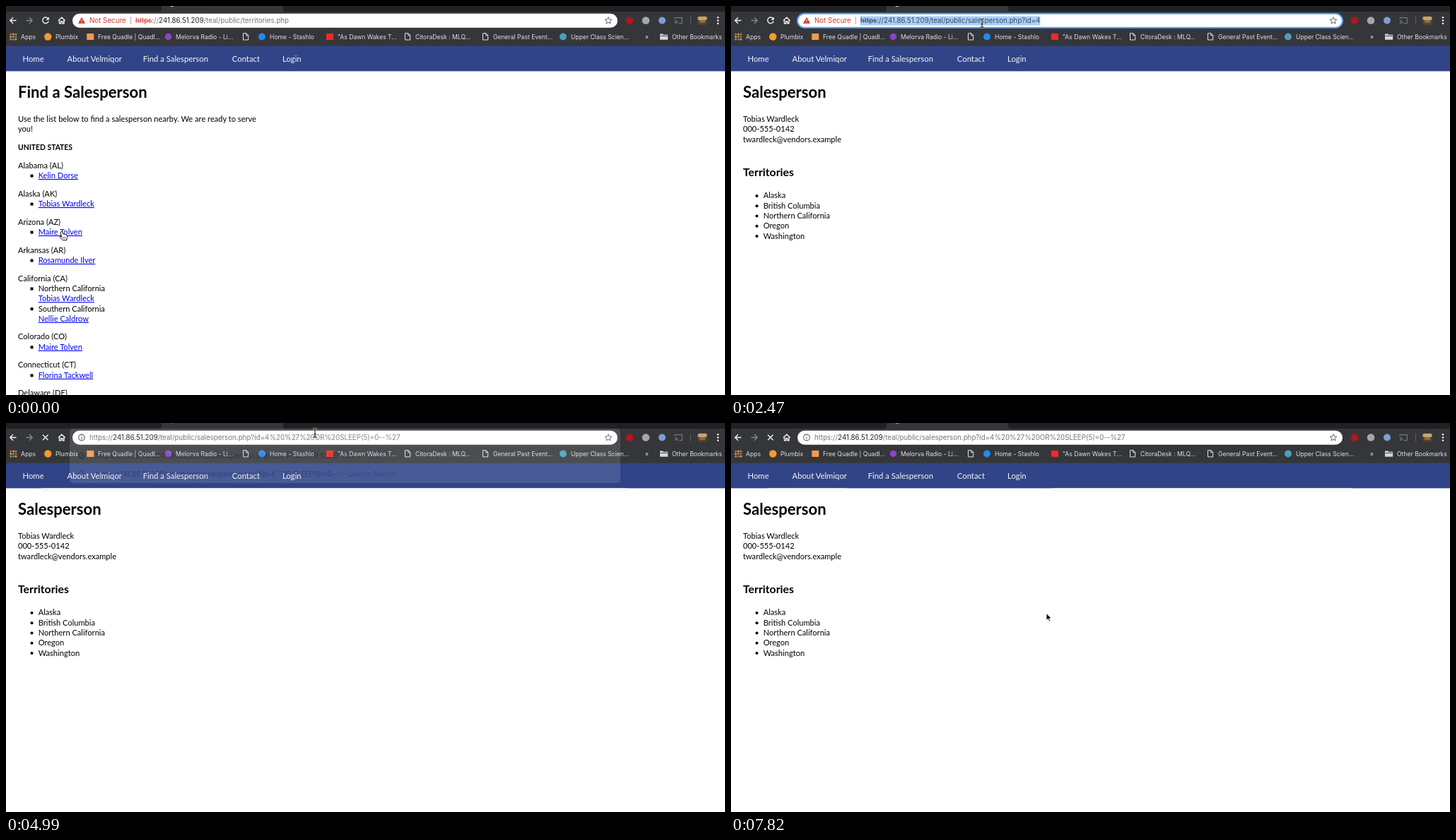
Recreate the animation shown at these times as an HTML page. Size 1017x551 px, loop 8000 ms.

```html
<!DOCTYPE html>
<html lang="en">
<head>
<meta charset="utf-8">
<title>Browser session</title>
<style>
  html, body { margin: 0; width: 100%; height: 100%; overflow: hidden; background: #fff; }
  svg { display: block; width: 100vw; height: 100vh; }
  text { white-space: pre; }
  .page text { font: 11.1px Lato, sans-serif; fill: #000; }
  .page .h1 { font-size: 22.1px; font-weight: 700; }
  .page .h2 { font-size: 15.8px; font-weight: 700; }
  .page .h3 { font-size: 10.4px; font-weight: 700; }
  .page .link { fill: #00e; text-decoration: underline; }
  .page .nav { font-size: 11.3px; fill: #f4f5fa; }
  .ui text { font: 9.76px Inter, sans-serif; fill: #70747a; }
  .ui .mark { font-size: 8.6px; fill: #dfe0e2; }
  .ui .host { fill: #202124; }
  .ui .warn { fill: #d3352b; }
  .ui .strike { fill: #d3352b; text-decoration: line-through; }
  .ui .selected, .ui .selected tspan { fill: #3a4654; }
  .ui .best { font-size: 9.95px; font-weight: 700; fill: #2f7de9; }
  .line { fill: none; stroke-width: 1.4; }
</style>
</head>
<body>
<svg id="stage" viewBox="0 0 1017 551" preserveAspectRatio="none"></svg>
<script>
const LOOP = 8000;
const HOST = '241.86.51.209';
const FOLDER = '/teal/public/';
const PERSON = 'Tobias Wardleck';
const ROW = 14.28, GAP = 11.43;

const text = (x, y, content, cls = '') => `<text x="${x}" y="${y}" class="${cls}">${content}</text>`;
const rect = (x, y, w, h, fill, r = 0) => `<rect x="${x}" y="${y}" width="${w}" height="${h}" rx="${r}" fill="${fill}"/>`;
const dot = (x, y, r, fill) => `<circle cx="${x}" cy="${y}" r="${r}" fill="${fill}"/>`;
const line = (d, stroke, extra = '') => `<path class="line" d="${d}" stroke="${stroke}" ${extra}/>`;
const group = (id, content, cls = '') => `<g id="${id}" class="${cls}">${content}</g>`;
const at = (x, y, content) => `<g transform="translate(${x} ${y})">${content}</g>`;
const address = (path, schemeCls = '') =>
  `<tspan class="${schemeCls}">https</tspan>://<tspan class="host">${HOST}</tspan>${FOLDER}${path}`;

function navBar() {
  const items = [[23.5, 'Home'], [86.5, 'About Velmiqor'], [193.7, 'Find a Salesperson'], [319.8, 'Contact'], [391, 'Login']];
  return rect(0, 56, 1017, 36.4, '#304487') + items.map(([x, label]) => text(x, 79.3, label, 'nav')).join('');
}

function territoryList() {
  const states = [
    ['Alabama (AL)', 'Kelin Dorse'],
    ['Alaska (AK)', PERSON],
    ['Arizona (AZ)', 'Maire Tolven'],
    ['Arkansas (AR)', 'Rosamunde Ilver'],
    ['California (CA)', '*Northern California', PERSON, '*Southern California', 'Nellie Caldrow'],
    ['Colorado (CO)', 'Maire Tolven'],
    ['Connecticut (CT)', 'Florina Tackwell'],
    ['Delaware (DE)']
  ];
  let y = 229.7, out = '';
  for (const [state, ...rows] of states) {
    out += text(17, y, state);
    rows.forEach((row, i) => {
      y += ROW;
      const region = row[0] === '*';
      if (region || i === 0) out += rect(34.5, y - 5.4, 4, 4, '#000');
      out += text(45.7, y, region ? row.slice(1) : row, region ? '' : 'link');
    });
    y += ROW + GAP;
  }
  return out;
}

function listPage() {
  return text(17, 129.5, 'Find a Salesperson', 'h1') +
    text(17, 164, 'Use the list below to find a salesperson nearby. We are ready to serve') +
    text(17, 178.2, 'you!') + text(17, 203.7, 'UNITED STATES', 'h3') + territoryList();
}

function personPage() {
  const contact = [PERSON, '000-555-0142', 'twardleck@vendors.example'];
  const areas = ['Alaska', 'British Columbia', 'Northern California', 'Oregon', 'Washington'];
  return text(17, 129.5, 'Salesperson', 'h1') +
    contact.map((row, i) => text(17, 164 + i * ROW, row)).join('') +
    text(17, 240.7, 'Territories', 'h2') +
    areas.map((row, i) => dot(36.5, 268.9 + i * ROW, 2, '#000') + text(45.7, 272.4 + i * ROW, row)).join('');
}

const sheet = x => line(`M${x - 3.5} 38.7h4.5l2.7 2.7v6.6h-7.2zM${x + .8} 38.7v3h2.9`, '#e4e5e7', 'style="stroke-width:1"');
const globe = y => at(107, y, dot(0, 0, 4.8, '#5f6368') +
  '<path d="M-3.6-1.6l2-1.6 1.6.8-1 1.6 1.4 1.2-1 2.6-1.2-2zM1.4-3.4l2.2 1.6-1.6 1zM1.6.8l2 .4-1.4 2z" fill="#fff"/>');

function bookmarks() {
  const items = [[70, 'Plumbix'], [130, 'Free Quadle | Quadl...'], [240, 'Melorva Radio - Li...'], [373, 'Home - Stashlo'],
    [469, '"As Dawn Wakes T...'], [579, 'CitoraDesk : MLQ...'], [689, 'General Past Event...'], [799, 'Upper Class Scien...'],
    [904, '»'], [942, 'Other Bookmarks'], [21, 'Apps']];
  const tiles = ['#e8574a', '#f0a63c', '#5cb46a'];
  let apps = '';
  for (let i = 0; i < 9; i++) apps += rect(5.5 + i % 3 * 3.6, 38.8 + Math.floor(i / 3) * 3.6, 2.5, 2.5, tiles[(i + Math.floor(i / 3)) % 3]);
  return apps + dot(59.3, 43.5, 5.2, '#f39a32') + rect(114.3, 39, 10, 9, '#ef9b55') +
    dot(229.5, 43.5, 4.7, '#8b45c9') + dot(362, 43.5, 5, '#2489ed') + rect(453, 39, 10, 9, '#ed2b25') +
    dot(788, 43.5, 5, '#4aa0bd') + [339, 568, 678].map(sheet).join('') +
    '<path d="M925 39.5h4l1.2 1.3h6v7h-11.2z" fill="#d5d7da"/>' + line('M925.5 42.5h10.2', '#45464a', 'style="stroke-width:1"') +
    items.map(([x, label]) => text(x, 46.7, label, 'mark')).join('');
}

function toolbar() {
  const white = '#f1f2f3', grey = '#85878b';
  return rect(0, 0, 1017, 56.7, '#35363a') +
    '<path d="M0 0H220V4q0 4-4 4H0zM392 0H1017V8H396q-4 0-4-4z" fill="#202124"/>' +
    line('M14.5 20.5H6M10 16.2L5.8 20.5l4.2 4.3', white) + line('M28.5 20.5H37M33 16.2l4.2 4.3-4.2 4.3', grey) +
    group('reload', line('M59.3 17.4A4.3 4.3 0 1 0 60.2 21.5', white) + '<path d="M60.8 15.4v4.4h-4.4z" fill="#f1f2f3"/>') +
    group('stop', line('M52 16.7l7.6 7.6M59.6 16.7L52 24.3', white)) +
    line('M74 20.8L78.8 16.3l4.8 4.5M75.5 20v4.8h2.2v-3h2.2v3H82V20', white) +
    rect(94, 10.7, 771, 20, '#fff', 10) +
    line('M852 15.7l1.4 3.2 3.5.3-2.7 2.3.8 3.4-3-1.8-3 1.8.8-3.4-2.7-2.3 3.5-.3z', '#5f6368', 'style="stroke-width:1"') +
    dot(882, 20.5, 5.2, '#b1161c') + dot(905, 20.5, 5.3, '#a5a7aa') + dot(928, 20.5, 5, '#7ba0d6') +
    line('M946 18.3V16.6h10.2v8h-3.8M946 24.6h1.2M946 22.5q2 .1 2.2 2.1M946 20.5q4 .1 4.3 4.1', '#85878b', 'style="stroke-width:1"') +
    rect(968, 15, 1, 11, '#5c5e62') +
    rect(978, 14, 14, 13, '#51412f', 3) + rect(978.5, 15, 13, 5, '#c3a574', 2) + rect(981, 20, 8, 4, '#8b6b42') +
    [16.3, 20.5, 24.7].map(y => dot(1007, y, 1.25, white)).join('') + bookmarks();
}

function secureChip() {
  return '<path d="M107 15.8l5 9h-10z" fill="#d3352b"/>' + rect(106.5, 18.7, 1, 3, '#fff') + rect(106.5, 22.5, 1, 1, '#fff') +
    text(118, 24.1, 'Not Secure', 'warn') + rect(176, 15, 1, 11, '#d09a98');
}

function infoChip() {
  return '<circle cx="107" cy="20.5" r="4.4" class="line" stroke="#5f6368" style="stroke-width:1.1"/>' +
    rect(106.5, 20, 1, 3, '#5f6368') + rect(106.5, 18, 1, 1, '#5f6368');
}

function dropdown() {
  const query = "salesperson.php?id=4 ' OR SLEEP(5)=0--'";
  const plain = `https://${HOST}${FOLDER}${query}`;
  return '<rect x="90" y="8" width="779" height="77" rx="5" fill="#fff" filter="url(#shade)"/>' +
    rect(90, 34, 779, 25.5, '#eff0f1') + globe(20.5) + globe(46.5) +
    '<circle cx="106" cy="71" r="2.9" class="line" stroke="#5f6368" style="stroke-width:1.2"/>' + line('M108.2 73.2l3.2 3.2', '#5f6368') +
    `<text id="typed" x="126.5" y="24.1">${address(query)}</text>` + group('caret', rect(0, 15, 1, 11.5, '#111')) +
    text(126.5, 50.1, plain.replaceAll("'", '%27'), 'best') +
    text(126.5, 75.9, `<tspan class="host">${plain}</tspan> - Querva Search`);
}

const beamPath = 'M-3-6q3 0 3 1.5q0-1.5 3-1.5M0-4.5V5M-3 6.3q3 0 3-1.5q0 1.5 3 1.5M-1.5 1.5h3';
const pointers = {
  hand: `<path d="M-3.4-6.2q1.2-.9 2 .4l1.4 3q1.5-.7 2.1.3 1.3-.6 1.8.5 1.2-.2 1.5 1.2.5 2.6-.5 4.2v2.3H-.8L-4.8 1.4q-.4-1.4.8-1.2l1.6 1L-3.9-4.8z" fill="#fff" stroke="#111"/>
    <path d="M.8 1.2v2.5M2.5 1v2.5M-.8 1.2v2.5" stroke="#333" stroke-width=".7"/>`,
  arrow: '<path d="M0 0v10.2l2.4-2.2 1.6 3.8 1.7-.7L4.1 7.4h3.3z" fill="#000" stroke="#fff" stroke-linejoin="round"/>',
  beam: line(beamPath, '#fff', 'style="stroke-width:2.4" opacity=".75"') + line(beamPath, '#111', 'style="stroke-width:1.1"')
};

const stage = document.getElementById('stage');
stage.innerHTML =
  '<defs><filter id="shade" x="-5%" y="-20%" width="110%" height="150%"><feDropShadow dx="0" dy="3" stdDeviation="3" flood-opacity=".1"/></filter></defs>' +
  rect(0, 0, 1017, 551, '#fff') +
  group('pages', navBar() + group('list', listPage()) + group('person', personPage()), 'page') +
  group('afterglow', rect(51, 92.4, 113, 4.6, '#f7f7f8') + group('middle', rect(164, 92.4, 290, 4.6, '#f7f7f8')) + rect(454, 92.4, 424, 4.6, '#f7f7f8')) +
  group('browser', toolbar() +
    '<path id="tabIcon" d="M232 0h6q-3 1.8-6 0z" fill="#fff"/>' +
    group('focusRing', '<rect x="94" y="10.8" width="771" height="20" rx="10" class="line" stroke="#5a9bf2" style="stroke-width:2"/>') +
    group('insecure', secureChip() + '<rect id="selection" x="183" y="14.5" height="13" fill="#a9d0fb"/>' +
      '<text id="url" x="183" y="24.1"></text>') +
    group('loading', infoChip() + text(118, 24.1, address('salesperson.php?id=4%20%27%20OR%20SLEEP(5)=0--%27'))) +
    group('popup', dropdown()), 'ui') +
  group('pointer', Object.entries(pointers).map(([kind, art]) => group(kind, art)).join(''));

const el = id => document.getElementById(id);
const show = (id, on) => el(id).setAttribute('visibility', on ? 'inherit' : 'hidden');
const setOpacity = (id, value) => el(id).setAttribute('opacity', value);

// Each move: first step, last step, number of steps, end point, pointer kind
const moves = [
  [140, 650, 4, 112, 284, 'hand'],
  [1250, 2020, 6, 348, 30, 'arrow'],
  [2170, 2170, 1, 355, 24, 'beam'],
  [3950, 4390, 4, 421, 17, 'beam'],
  [4540, 4540, 1, 437, 14, 'beam'],
  [5140, 5880, 6, 446, 269.5, 'arrow']
];

function pointerAt(t) {
  let x = 81, y = 326, kind = 'hand';
  for (const [start, end, steps, toX, toY, nextKind] of moves) {
    if (t < start) break;
    const step = steps === 1 ? 1 : Math.min(steps, 1 + Math.floor((t - start) / (end - start) * (steps - 1) + 1e-6));
    const p = step / steps, eased = p * p * (3 - 2 * p);
    x += (toX - x) * eased;
    y += (toY - y) * eased;
    kind = nextKind;
  }
  return { x, y, kind };
}

function popupOpacity(t) {
  if (t < 3360 || t >= 5140) return 0;
  if (t < 3510) return .98;
  return t < 4840 ? 1 : t < 4990 ? .6 : .12;
}

let shownUrl = '';
function setUrl(path, selected) {
  const key = path + selected;
  if (key === shownUrl) return;
  shownUrl = key;
  const url = el('url');
  url.innerHTML = address(path, 'strike');
  url.setAttribute('class', selected ? 'selected' : '');
  el('selection').setAttribute('width', url.getComputedTextLength());
}

function draw(t) {
  const onList = t < 1100, focused = t >= 2320 && t < 4840, loading = t >= 4840;
  show('list', onList);
  show('person', !onList);
  setUrl(onList ? 'territories.php' : 'salesperson.php?id=4', focused);
  show('insecure', !loading);
  show('loading', loading);
  show('selection', focused);
  show('focusRing', focused);
  show('reload', !loading);
  show('stop', loading);
  show('afterglow', loading);
  show('middle', loading && t < 5290);

  const opacity = popupOpacity(t);
  show('popup', opacity > 0);
  setOpacity('popup', opacity);
  show('caret', opacity > 0 && !loading && Math.floor((t - 3360) / 500) % 2 === 0);
  el('caret').setAttribute('transform', `translate(${126.5 + el('typed').getComputedTextLength()} 0)`);
  setOpacity('tabIcon', loading ? .35 + .3 * Math.sin(Math.floor(t / 150) / 2) : .9);

  const { x, y, kind } = pointerAt(t);
  el('pointer').setAttribute('transform', `translate(${x} ${y})`);
  for (const name in pointers) show(name, name === kind);
}

const origin = performance.now();
function tick() {
  draw((performance.now() - origin) % LOOP);
  requestAnimationFrame(tick);
}
tick();
</script>
</body>
</html>
```
